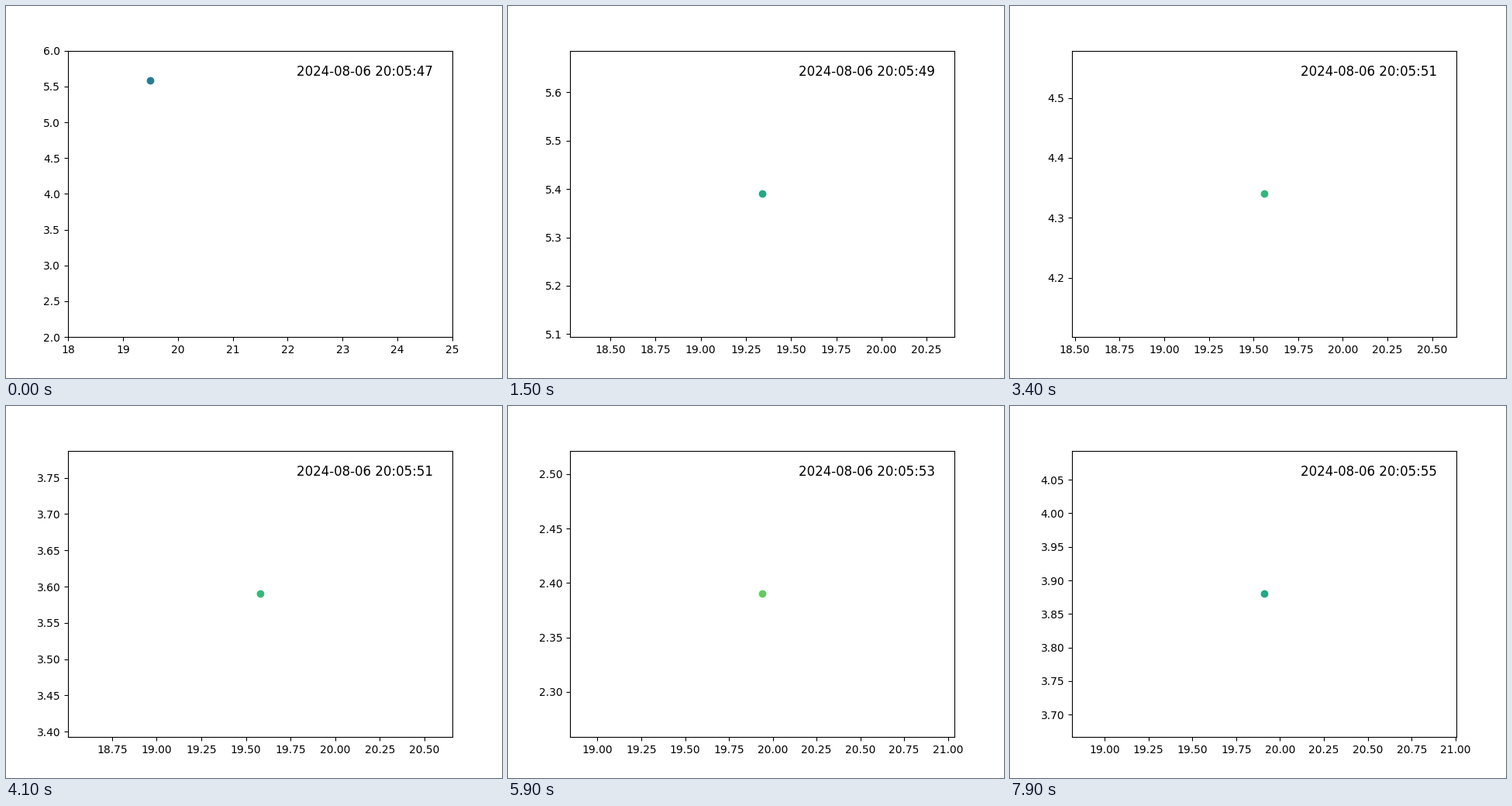
A matplotlib script that plays this animation: 640 px wide and 480 px high, repeating every 8000 ms.

```python
import numpy as np
import matplotlib.pyplot as plt
from matplotlib.animation import FuncAnimation

FRAMES = 80
INTERVAL = 100
START_SECOND = 47.75

# Key poses of the drifting point: step, x, y, shade
KEYS = np.array([
    (0, 19.50, 5.58, 0.42),
    (15, 19.34, 5.39, 0.60),
    (34, 19.56, 4.34, 0.66),
    (48, 19.63, 2.88, 0.69),
    (59, 19.94, 2.39, 0.76),
    (68, 19.95, 2.94, 0.82),
    (79, 19.91, 3.88, 0.60),
])
KEY_STEPS, POSES = KEYS[:, 0], KEYS[:, 1:]
SLOPES = np.gradient(POSES, KEY_STEPS, axis=0)


def pose(i):
    """Cubic Hermite blend of the two key poses around step i."""
    k = min(np.searchsorted(KEY_STEPS, i, side="right") - 1, len(KEYS) - 2)
    h = KEY_STEPS[k + 1] - KEY_STEPS[k]
    u = (i - KEY_STEPS[k]) / h
    ease = u * u * (3 - 2 * u)
    bend = u * (1 - u) * h * ((1 - u) * SLOPES[k] - u * SLOPES[k + 1])
    return (1 - ease) * POSES[k] + ease * POSES[k + 1] + bend


fig, ax = plt.subplots(figsize=(6.4, 4.8), dpi=100)
cmap = plt.get_cmap("viridis")


def update(i):
    x, y, shade = pose(i).round(2)
    ax.clear()
    ax.scatter([x], [y], color=[cmap(shade)])
    second = int(START_SECOND + i * INTERVAL / 1000)
    ax.text(0.95, 0.95, f"2024-08-06 20:05:{second:02d}", fontsize=12,
            ha="right", va="top", transform=ax.transAxes)
    # Fixed view at the start, then the axes follow the point.
    if i == 0:
        ax.set(xlim=(18, 25), ylim=(2, 6))


anim = FuncAnimation(fig, update, frames=FRAMES, init_func=lambda: None,
                     interval=INTERVAL, repeat=True, repeat_delay=0)
plt.show()
```
